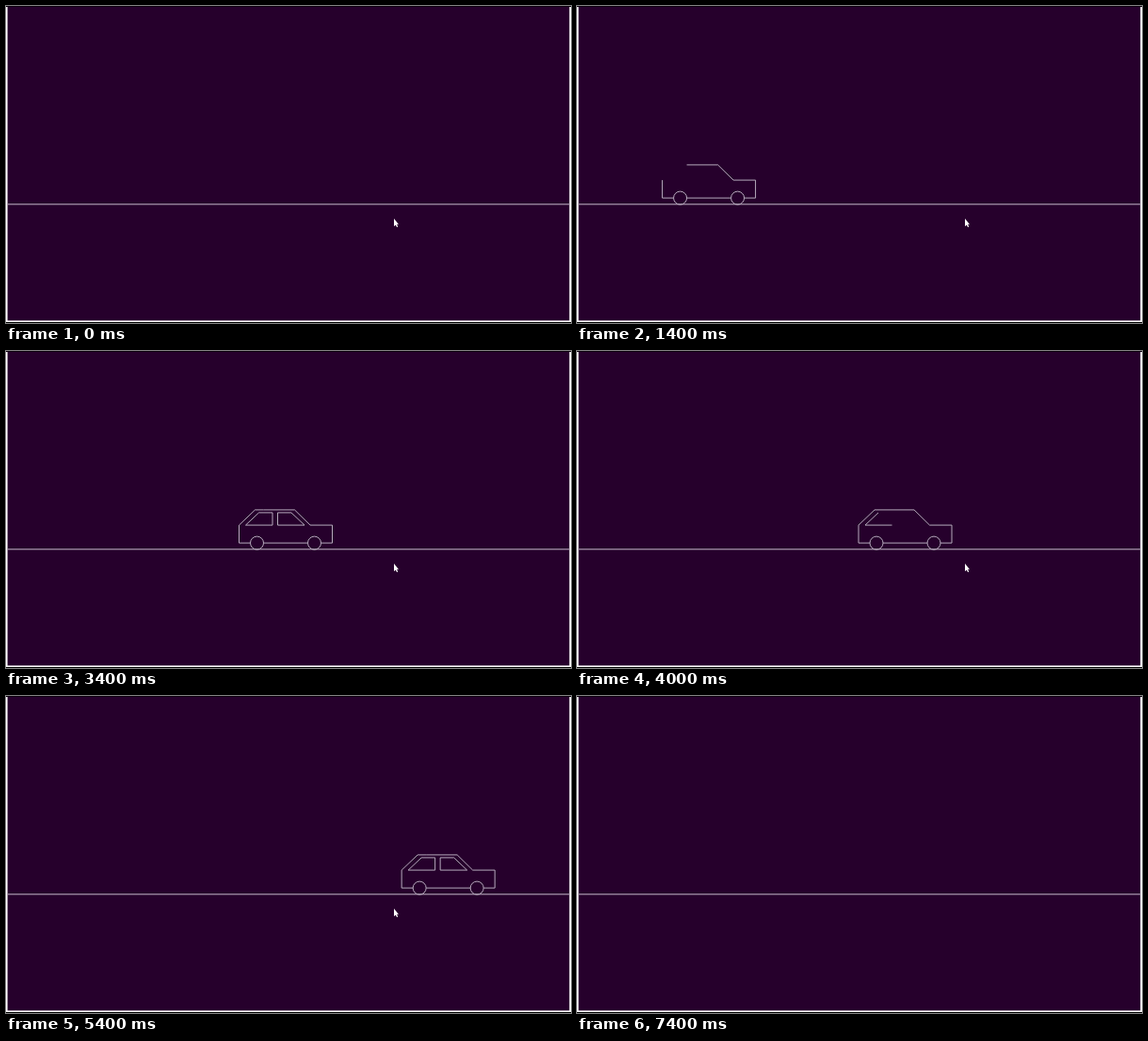
These frames come from a looping animation (600x337 px, 7900 ms). An HTML page with a canvas:

```html
<!DOCTYPE html>
<html lang="en">
<head>
<meta charset="utf-8">
<title>Line car</title>
<style>
  html, body { margin: 0; width: 100%; height: 100%; overflow: hidden; background: #fff; }
  canvas { display: block; }
</style>
</head>
<body>
<canvas id="stage" width="600" height="337"></canvas>
<script>
const ctx = document.getElementById('stage').getContext('2d');
const LOOP = 7900, STEP = 100, LAST = 74, CURSOR_GONE = 70;
const ROOF = 168.9, GLASS = 171.9, HOOD = 185.1, SILL = 204.1, ROAD = 210.8;

// Each stroke is a function that adds to the current path.
const path = (...points) => points.slice(1).map((to, i) => () => {
  ctx.moveTo(...points[i]);
  ctx.lineTo(...to);
});
const wheel = x => () => {
  ctx.moveTo(x + 7, SILL);
  ctx.arc(x, SILL, 7, 0, Math.PI * 2);
};

// In drawing order; x counts from the rear of the car.
const strokes = [
  ...path([26, ROOF], [59, ROOF], [75.5, HOOD], [99, HOOD], [99, SILL], [87, SILL]),
  wheel(80),
  ...path([73, SILL], [26, SILL]),
  wheel(19),
  ...path([12, SILL], [0, SILL], [0, HOOD], [17, ROOF], [26, ROOF]),
  ...path([21, GLASS], [7, HOOD], [35.5, HOOD], [35.5, GLASS], [21, GLASS]),
  ...path([41, GLASS], [41, HOOD], [69.5, HOOD], [55.5, GLASS], [41, GLASS])
];

// The drive speeds up slightly: [step, x of the rear].
const drive = [[1, 10.5], [8, 43.5], [34, 247.5], [46, 350.5], [63, 498.5], [73, 589.5]];

function rearAt(step) {
  const i = Math.max(1, drive.findIndex(key => key[0] >= step));
  const [s0, x0] = drive[i - 1], [s1, x1] = drive[i];
  return x0 + (x1 - x0) * (step - s0) / (s1 - s0);
}

// The car is redrawn over and over; each step catches it a little
// earlier in its redraw, and the lag grows with the speed.
function strokesDone(step) {
  const cycle = 25, d = step - 14;
  const beat = 9.7 - 0.66 * d - 0.0056 * d * d;
  return Math.ceil(beat - cycle * Math.floor(beat / cycle));
}

function rect(color, x, y, w, h) {
  ctx.fillStyle = color;
  ctx.fillRect(x, y, w, h);
}

function drawScene() {
  rect('#fff', 0, 0, 600, 337);
  rect('#26002c', 1.6, 0, 596.7, 334.4);
  rect('#0c000e', 0, 0, 600, 1);
  rect('#000', 0, 336, 600, 1);
  rect('#c2bac8', 2, ROAD - 0.5, 596, 1);
}

function drawCar(step) {
  ctx.save();
  ctx.beginPath();
  ctx.rect(2, 1, 596, 333);
  ctx.clip();
  ctx.translate(rearAt(step), 0);
  ctx.beginPath();
  strokes.slice(0, strokesDone(step)).forEach(add => add());
  ctx.strokeStyle = '#bdb4c3';
  ctx.lineWidth = 0.95;
  ctx.stroke();
  ctx.restore();
}

function drawCursor() {
  ctx.fillStyle = '#fff';
  ctx.fill(new Path2D('M412 226v8.3l1.8-1.6 1.3 2.5 1.1-.6-1.2-2.4h2z'));
}

let start, shown = -1;
function tick(now) {
  start ??= now;
  const step = Math.min(LAST, Math.floor((now - start) % LOOP / STEP));
  if (step !== shown) {
    shown = step;
    drawScene();
    if (step > 0 && step < LAST) drawCar(step);
    if (step < CURSOR_GONE) drawCursor();
  }
  requestAnimationFrame(tick);
}
tick(performance.now());
</script>
</body>
</html>
```
